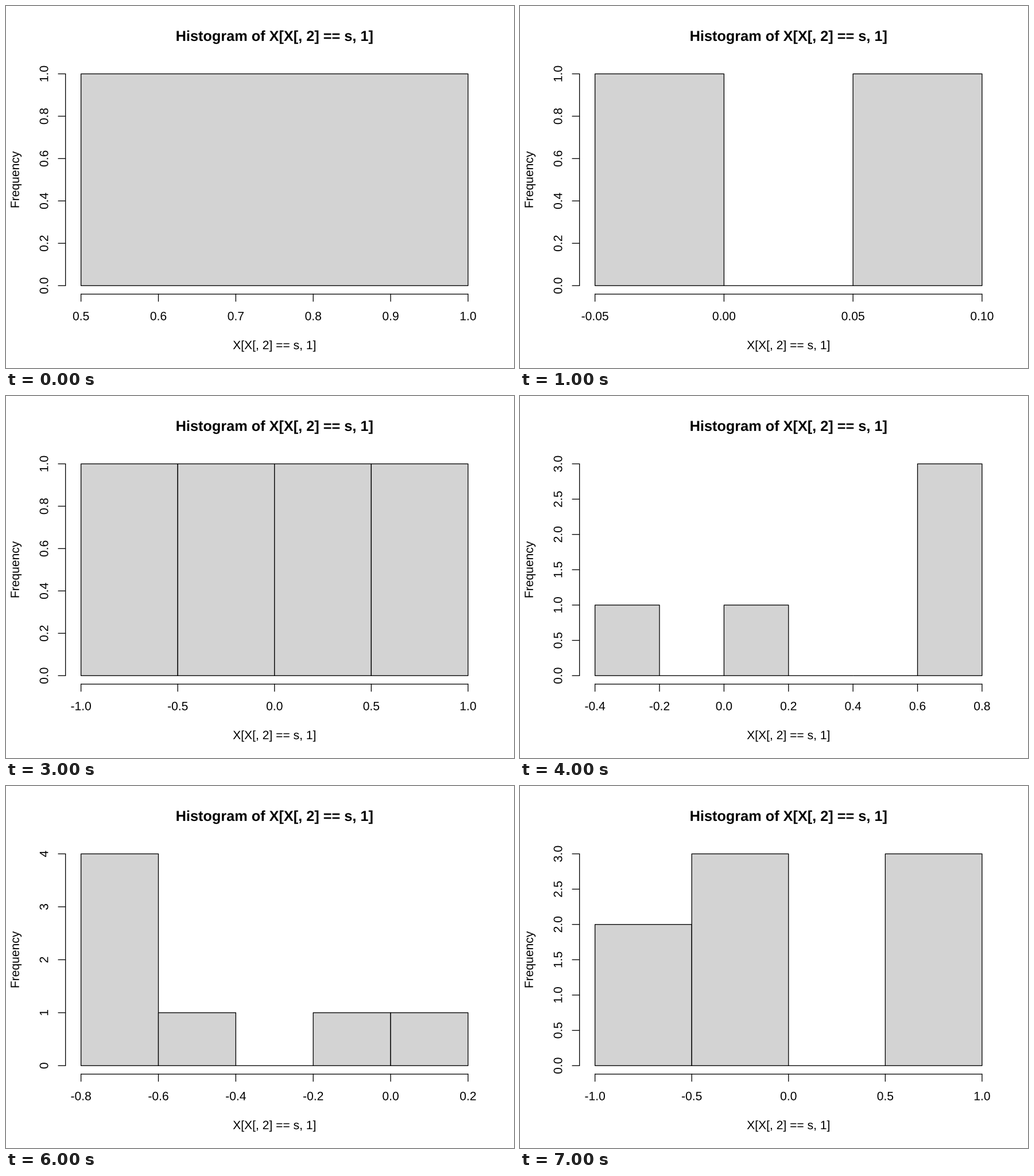
Write a matplotlib script that moves like this. It is 885x632 px and loops after 8000 ms.

```python
import math

import matplotlib.pyplot as plt
from matplotlib.animation import FuncAnimation
from matplotlib.patches import PathPatch, Rectangle
from matplotlib.textpath import TextPath
from matplotlib.transforms import Affine2D

W, H, DPI = 885, 632, 64
INCH = W / 7               # the plot is 7 inches wide
LINE = INCH / 5            # height of one margin line
FONT = INCH / 6            # 12 pt
STROKE = INCH / 96 * 72 / DPI

# plot region, then the data area inside its 4 % padding
LEFT, RIGHT = 4.1 * LINE, W - 2.1 * LINE
TOP, BOTTOM = 4.1 * LINE, H - 5.1 * LINE
PAD = 0.04 / 1.08
X0, X1 = LEFT + PAD * (RIGHT - LEFT), RIGHT - PAD * (RIGHT - LEFT)
Y0, Y1 = BOTTOM - PAD * (BOTTOM - TOP), TOP + PAD * (BOTTOM - TOP)

# range and counts of equal bins, one sample size after the other
HISTS = [
    (0.5, 1.0, [1]),
    (-0.05, 0.1, [1, 0, 1]),
    (0.0, 0.8, [1, 0, 1, 1]),
    (-1.0, 1.0, [1] * 4),
    (-0.4, 0.8, [1, 0, 1, 0, 0, 3]),
    (-1.0, 1.0, [2, 1, 1, 2]),
    (-0.8, 0.2, [4, 1, 0, 1, 1]),
    (-1.0, 1.0, [2, 3, 0, 3]),
]

fig = plt.figure(figsize=(W / DPI, H / DPI), dpi=DPI, facecolor="white")
ax = fig.add_axes([0, 0, 1, 1])


def text(x, y, s, size=FONT, weight="normal", angle=0):
    """Draw s centred on its advance width, with its baseline at y."""
    def outline(string):
        return TextPath((0, 0), string, size=size,
                        prop={"family": "Liberation Sans", "weight": weight})

    advance = outline(s + "|").get_extents().x1 - outline("|").get_extents().x1
    place = (Affine2D().translate(-advance / 2, 0).scale(1, -1)
             .rotate_deg(-angle).translate(x, y))
    ax.add_patch(PathPatch(place.transform_path(outline(s)),
                           fc="black", lw=0, snap=False))


def segment(xs, ys):
    ax.plot(xs, ys, color="black", lw=STROKE,
            solid_capstyle="round", snap=False)


def pretty_step(span):
    """Round step of 1, 2, 5 or 10 times a power of ten, for about 5 ticks."""
    cell = span * 1.08 / 5
    base = 10 ** math.floor(math.log10(cell))
    step = base
    for factor, bias in (2, 0.8), (5, 1.7), (10, 0.8):
        if factor * base - cell < bias * (cell - step):
            step = factor * base
    return step


def ticks(lo, hi):
    """Yield each tick's relative place and its label."""
    step = pretty_step(hi - lo)
    count = round((hi - lo) / step)
    digits = max(0, -math.floor(math.log10(step) + 1e-9))
    for i in range(count + 1):
        value = round(lo + i * step, 4) + 0.0
        yield i / count, f"{value:.{digits}f}"


def x_axis(lo, hi):
    segment([X0, X1], [BOTTOM, BOTTOM])
    for t, label in ticks(lo, hi):
        x = X0 + t * (X1 - X0)
        segment([x, x], [BOTTOM, BOTTOM + LINE / 2])
        text(x, BOTTOM + 1.8 * LINE, label)


def y_axis(top):
    segment([LEFT, LEFT], [Y0, Y1])
    for t, label in ticks(0, top):
        y = Y0 + t * (Y1 - Y0)
        segment([LEFT, LEFT - LINE / 2], [y, y])
        text(LEFT - 1.2 * LINE, y, label, angle=90)


def bars(counts):
    width = (X1 - X0) / len(counts)
    for i, n in enumerate(counts):
        height = (Y1 - Y0) * n / max(counts)
        ax.add_patch(Rectangle((X0 + i * width, Y0), width, height,
                               fc="lightgray", ec="black", lw=STROKE,
                               joinstyle="round", snap=False))


def titles():
    mid_x, mid_y = (LEFT + RIGHT) / 2, (TOP + BOTTOM) / 2
    big = 1.2 * FONT
    name = "X[X[, 2] == s, 1]"
    text(mid_x, TOP / 2 + 0.36 * big, "Histogram of " + name, big, "bold")
    text(mid_x, BOTTOM + 3.8 * LINE, name)
    text(LEFT - 3.2 * LINE, mid_y, "Frequency", angle=90)


def draw(frame):
    lo, hi, counts = HISTS[frame]
    ax.clear()
    ax.set_axis_off()
    ax.set_xlim(0, W)
    ax.set_ylim(H, 0)
    bars(counts)
    x_axis(lo, hi)
    y_axis(max(counts))
    titles()
    return []


anim = FuncAnimation(fig, draw, frames=len(HISTS), init_func=lambda: [],
                     interval=1000, repeat=True)
plt.show()
```
